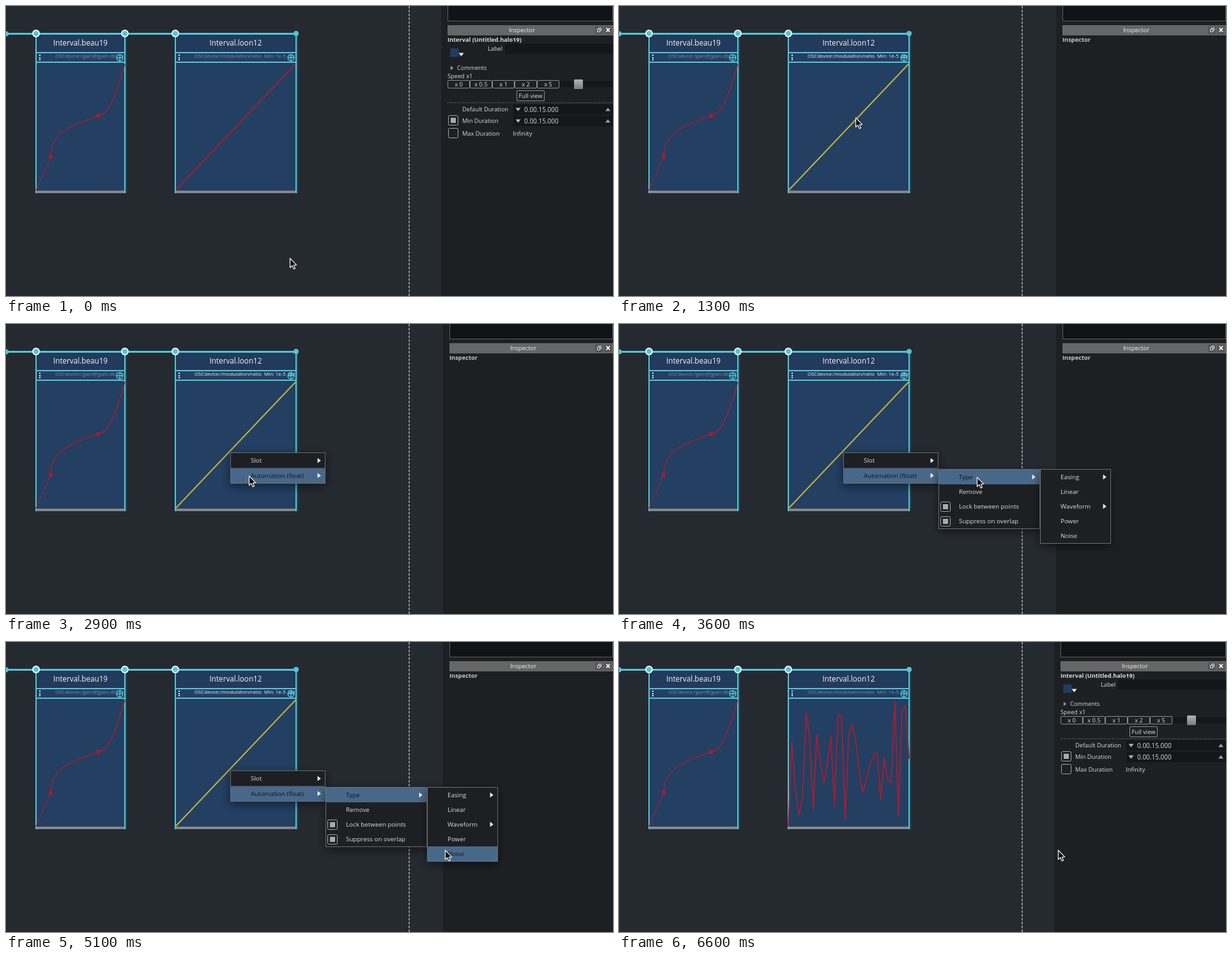
These frames come from a looping animation (950x454 px, 6.7 s). An HTML page with a canvas:

```html
<!DOCTYPE html>
<html lang="en">
<head>
<meta charset="utf-8">
<title>Automation menu</title>
<style>
html, body { margin: 0; width: 100%; height: 100%; overflow: hidden; background: #252a30; }
canvas { display: block; }
</style>
</head>
<body>
<canvas id="stage" width="950" height="454"></canvas>
<script>
const g = document.getElementById('stage').getContext('2d');
const LOOP = 6700, STEP = 100;
const SELECT = 1000, MENU = 1900, SUB = 3000, TYPES = 3600, APPLY = 5300;
const TEAL = '#50c5d8', RED = '#a01f33', PALE = '#dcdcdc', DARK = '#1e1f23', FIELD = '#141619';
const FACE = '"Open Sans", "Noto Sans", sans-serif';

// Pointer stops: time, x, y
const PATH = [
  [200, 444, 395], [900, 370, 175], [1400, 370, 175], [1800, 350, 200], [2100, 350, 200],
  [2700, 380, 238], [3000, 380, 238], [3600, 560, 240], [3900, 590, 241], [4300, 656, 254],
  [4900, 687, 326]
];
const NOISE = [289, 157, 232, 270, 245, 111, 150, 262, 144, 187, 220, 190, 147, 258, 113, 118, 278,
  145, 129, 155, 205, 235, 215, 192, 177, 174, 246, 181, 217, 220, 91, 273, 108, 100, 183];

function rect(x, y, w, h, fill) {
  g.fillStyle = fill;
  g.fillRect(x, y, w, h);
}

function frame(x, y, w, h, color, radius = 0) {
  g.strokeStyle = color;
  g.lineWidth = 1;
  g.beginPath();
  g.roundRect(x + .5, y + .5, w - 1, h - 1, radius);
  g.stroke();
}

function disc(x, y, r, fill) {
  g.fillStyle = fill;
  g.beginPath();
  g.arc(x, y, r, 0, Math.PI * 2);
  g.fill();
}

function text(str, x, y, size, color = PALE, weight = 400, align = 'left') {
  g.font = `${weight} ${size}px ${FACE}`;
  g.textAlign = align;
  g.fillStyle = color;
  g.fillText(str, x, y);
}

function poly(points, color, width = 1.5) {
  g.beginPath();
  points.forEach(([x, y]) => g.lineTo(x, y));
  g.strokeStyle = color;
  g.lineWidth = width;
  g.stroke();
}

// Triangle pointing 0 right, 1 down, 3 up
function arrow(x, y, turn, size, color = PALE) {
  g.save();
  g.translate(x, y);
  g.rotate(turn * Math.PI / 2);
  g.fillStyle = color;
  g.beginPath();
  g.moveTo(-size * .6, -size);
  g.lineTo(size * .7, 0);
  g.lineTo(-size * .6, size);
  g.fill();
  g.restore();
}

function check(x, y, on) {
  frame(x, y, 16, 16, '#a2a3a5', 2);
  if (on) rect(x + 4, y + 4, 8, 8, '#a9a9ab');
}

function pointerAt(t) {
  const i = PATH.findIndex(p => p[0] > t);
  if (i === 0) return PATH[0].slice(1);
  if (i < 0) return PATH[PATH.length - 1].slice(1);
  const [t0, x0, y0] = PATH[i - 1], [t1, x1, y1] = PATH[i];
  let k = (t - t0) / (t1 - t0);
  k = k * k * (3 - 2 * k);
  return [x0 + (x1 - x0) * k, y0 + (y1 - y0) * k];
}

function node(x, right, title, address, ink) {
  const w = right - x;
  rect(right + 1, 45, 2, 248, '#205058');
  rect(x, 43, w, 249, '#233f62');
  rect(x, 45, w, 27, '#223a5b');
  rect(x - 1, 289, w + 2, 4, '#85878a');
  rect(x, 72, w, 2, TEAL);
  rect(x, 87, w, 2, TEAL);
  text(title, (x + right) / 2, 62, 11.7, '#f4f6f8', 400, 'center');
  [77, 81, 84].forEach(y => rect(x + 5, y - 1, 2, 2, '#e8eef2'));
  g.save();
  g.beginPath();
  g.rect(x, 74, w - 2, 13);
  g.clip();
  text(address, x + 30, 81, 7.8, ink);
  g.restore();
  const cx = right - 8;
  g.strokeStyle = TEAL;
  g.lineWidth = 1.3;
  g.beginPath();
  g.arc(cx, 81, 5, 0, Math.PI * 2);
  g.moveTo(cx - 5, 81);
  g.lineTo(cx + 5, 81);
  g.moveTo(cx, 76);
  g.lineTo(cx, 86);
  g.stroke();
}

function edges(x, right) {
  rect(x - 1, 43, 2, 250, TEAL);
  rect(right - 1, 43, 2, 250, TEAL);
}

function gainCurve() {
  g.setLineDash([6, 2]);
  poly([[47, 289], [70, 236]], RED);
  g.setLineDash([]);
  g.beginPath();
  g.moveTo(70, 236);
  g.bezierCurveTo(70, 200, 95, 190, 144, 172);
  g.bezierCurveTo(160, 172, 172, 140, 186, 91);
  g.stroke();
  disc(70, 236, 3.3, RED);
  disc(144, 172, 3.3, RED);
}

function score(t) {
  const picked = t >= SELECT && t < APPLY;
  rect(0, 0, 950, 454, '#252a30');
  g.setLineDash([4, 2]);
  poly([[631, 0], [631, 454]], '#a3a6a9', 1.6);
  g.setLineDash([]);

  node(47, 186, 'Interval.beau19', 'OSCdevice:/gain@[gain.db]  Min', '#7f8c9d');
  node(265, 454, 'Interval.loon12', 'OSCdevice:/modulation/ratio  Min: 1e-5  Max: 1',
    picked ? '#f0f3f6' : '#7f8c9d');
  edges(47, 186);
  edges(265, 454);
  gainCurve();
  if (t >= APPLY) {
    g.lineJoin = 'round';
    poly(NOISE.map((y, i) => [265 + i * 189 / (NOISE.length - 1), y]), RED, 1.9);
  } else {
    poly([[266, 288], [453, 91]], picked ? '#c5b33c' : RED, 1.9);
  }

  rect(0, 42, 454, 3, TEAL);
  disc(0, 43.5, 4, TEAL);
  disc(454, 43, 4, TEAL);
  [47, 186, 265].forEach(x => {
    disc(x, 43, 6, '#f5fafb');
    disc(x, 43, 4, TEAL);
  });
}

function button(label, x, y, w, h) {
  frame(x, y, w, h, '#8b8c8e', 1.5);
  text(label, x + w / 2, y + h / 2 + 3.6, 9.3, PALE, 400, 'center');
}

function spinner(y) {
  rect(794, y, 156, 16, FIELD);
  arrow(801.5, y + 8, 1, 4, '#b5b5b5');
  text('0.00.15.000', 811, y + 12, 10);
  arrow(942, y + 8, 3, 4, '#a0a0a0');
}

function details() {
  text('Interval (Untitled.halo19)', 691, 56, 9.2, PALE, 700);
  rect(695, 66, 14, 14, '#1f3d64');
  frame(695, 66, 14, 14, '#29313c');
  arrow(712.5, 76, 1, 4, '#eeeeee');
  text('Label', 754, 70, 9.25);
  rect(781, 59, 169, 16, FIELD);
  arrow(698, 97, 0, 3.5, '#8d8e90');
  text('Comments', 706, 100, 9.1);
  text('Speed x1', 691, 113, 9.25);
  ['x 0', 'x 0.5', 'x 1', 'x 2', 'x 5'].forEach((s, i) => button(s, 691 + i * 35, 116, 35, 13));
  rect(868, 118, 82, 9, FIELD);
  const shade = g.createLinearGradient(0, 115, 0, 130);
  shade.addColorStop(0, '#b2b2b2');
  shade.addColorStop(1, '#7c7c7c');
  g.fillStyle = shade;
  g.beginPath();
  g.roundRect(889, 115, 14, 15, 1.5);
  g.fill();
  button('Full view', 799, 132, 44, 17);
  g.setLineDash([1, 2]);
  poly([[691, 151.5], [950, 151.5]], '#8a8b8d', 1);
  g.setLineDash([]);
  text('Default Duration', 714, 165, 9.25);
  spinner(154);
  check(692, 171, true);
  text('Min Duration', 714, 183, 9.25);
  spinner(172);
  check(692, 191, false);
  text('Max Duration', 714, 203, 9.25);
  text('Infinity', 793, 203, 9.5);
}

function inspector(t) {
  const empty = t >= SELECT && t < APPLY;
  const x = empty ? 694 : 691;
  rect(x - 10, 0, 960 - x, 454, DARK);
  rect(x, -2, 950 - x, 26, '#111417');
  frame(x, -2, 950 - x, 26, '#5b5c5f');
  rect(x, 30, 950 - x, 16, '#666667');
  text('Inspector', empty ? 809.5 : 807.5, 41, 9.4, '#f0f0f0', 400, 'center');

  rect(922, 32, 12, 12, '#565657');
  rect(936, 32, 12, 12, '#565657');
  frame(927, 34, 5, 5, '#e4e4e4');
  rect(925, 36, 5, 5, '#565657');
  frame(925, 36, 5, 5, '#e4e4e4');
  poly([[939.5, 34.5], [945, 40.5]], '#ffffff', 1.8);
  poly([[945, 34.5], [939.5, 40.5]], '#ffffff', 1.8);

  if (empty) text('Inspector', 694, 56, 9.3, '#c8c8c8', 700);
  else details();
}

function menu(x, y, w, h, items, hot, indent) {
  g.save();
  g.shadowColor = 'rgba(0,0,0,.5)';
  g.shadowBlur = 14;
  g.shadowOffsetY = 4;
  rect(x, y, w, h, DARK);
  g.restore();
  items.forEach((item, i) => {
    const [label, kind] = item.split('|');
    const top = y + 1 + i * (h - 2) / items.length;
    const mid = top + (h - 2) / items.length / 2;
    if (i === hot) rect(x + 1, top, w - 2, (h - 2) / items.length, '#48688a');
    text(label, x + indent, mid + 3.4, 9.8, i === hot ? '#101317' : PALE, 500);
    if (kind === 'more') arrow(x + w - 10, mid, 0, 4, '#f0f0f0');
    if (kind === 'check') check(x + 3, Math.round(mid) - 8, true);
  });
  frame(x, y, w, h, '#696c70');
}

function menus(t, [px, py]) {
  if (t < MENU || t >= APPLY) return;
  const inMain = px < 500;
  const mainHot = !inMain || py > 225 ? 1 : py > 202 ? 0 : -1;
  menu(351, 201, 149, 49, ['Slot|more', 'Automation (float)|more'], mainHot, 32);
  if (t < SUB) return;
  const subHot = inMain ? -1 : px > 659 ? 0 : Math.floor((py - 228) / 23);
  menu(500, 227, 159, 94,
    ['Type|more', 'Remove', 'Lock between points|check', 'Suppress on overlap|check'], subHot, 32);
  if (t < TYPES) return;
  const typeHot = px > 659 ? Math.floor((py - 228) / 23) : -1;
  menu(659, 227, 111, 117, ['Easing|more', 'Linear', 'Waveform|more', 'Power', 'Noise'], typeHot, 32);
}

function pointer([x, y]) {
  g.save();
  g.translate(x, y);
  g.beginPath();
  [[.5, 0], [.5, 14.5], [3.8, 11.6], [6.2, 16.8], [8.6, 15.7], [6.3, 10.8], [10.6, 10.4]]
    .forEach(p => g.lineTo(...p));
  g.closePath();
  g.lineJoin = 'round';
  g.fillStyle = '#0b0c0e';
  g.fill();
  g.strokeStyle = '#e6e7e8';
  g.lineWidth = 1.3;
  g.stroke();
  g.restore();
}

const start = performance.now();
function draw(now) {
  const t = Math.floor(Math.max(0, now - start) % LOOP / STEP) * STEP;
  const at = pointerAt(t);
  score(t);
  inspector(t);
  menus(t, at);
  pointer(at);
  requestAnimationFrame(draw);
}
draw(start);
</script>
</body>
</html>
```
